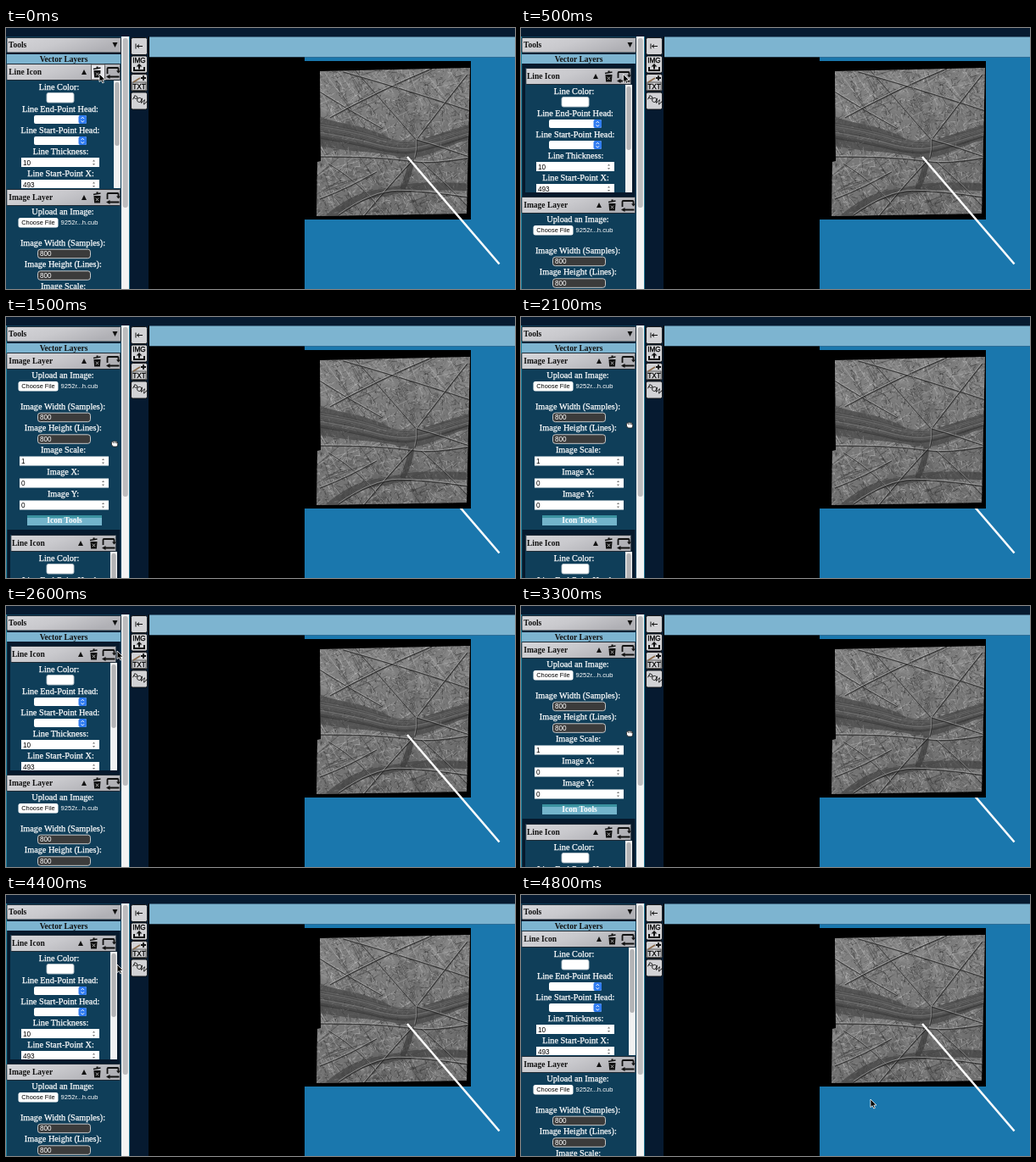
Animation of 600x308 px, one loop 4900 ms. Source, as an HTML page with a canvas:

```html
<!DOCTYPE html>
<html lang="en">
<head>
<meta charset="utf-8">
<title>Layer ordering</title>
<style>
html, body { margin: 0; width: 100%; height: 100%; overflow: hidden; background: #000; }
#stage { position: relative; width: 600px; height: 308px; overflow: hidden; background: #061a30; }
#stage > * { position: absolute; left: 0; top: 0; }
#moon { left: 352px; top: 39px; z-index: 2; }
#ray { z-index: 3; }
#ray.under { z-index: 1; }
#ui, #pointer { z-index: 4; }
text { font-family: "Liberation Serif", Tinos, serif; }
.label { font-size: 10.25px; fill: #fff; text-anchor: middle; stroke: #fff; stroke-width: .25; }
.title { font-size: 9.5px; font-weight: bold; fill: #111; }
.sans { font-family: "Liberation Sans", Arial, sans-serif; font-size: 8.2px; }
.mid { text-anchor: middle; }
</style>
</head>
<body>
<div id="stage">
  <svg id="back" width="600" height="308">
    <rect x="169" y="10.5" width="431" height="24" fill="#7db4d0"/>
    <rect x="169" y="34.5" width="183" height="274" fill="#000"/>
    <rect x="352" y="34.5" width="248" height="274" fill="#1a77ad"/>
  </svg>
  <canvas id="moon" width="196" height="187"></canvas>
  <svg id="ray" width="600" height="308">
    <path d="M473 152L581.5 278.5" stroke="#fff" stroke-width="2.5"/>
  </svg>
  <svg id="ui" width="600" height="308">
    <defs>
      <linearGradient id="metal" x2="1" y2=".4">
        <stop stop-color="#d6d6da"/><stop offset=".5" stop-color="#c9c9cd"/><stop offset="1" stop-color="#b0b0b5"/>
      </linearGradient>
      <clipPath id="fold"><rect y="42" width="136" height="147"/></clipPath>
      <clipPath id="side"><rect y="10" width="136" height="298"/></clipPath>
      <g id="trash">
        <path d="M-4.5 -4L4 -5.5M-1 -6L1 -6.4" stroke="#111" stroke-width="1.5"/>
        <path d="M-4 -2.6H4L3.4 6H-3.4Z" fill="#111"/>
        <path d="M-1.6 .2L1.6 3.6M1.6 .2L-1.6 3.6" stroke="#bbb" stroke-width=".9"/>
      </g>
      <g id="cycle" fill="none" stroke="#111" stroke-width="1.8">
        <path d="M-6.5 2V-4Q-6.5 -5 -5.5 -5H5.5Q6.5 -5 6.5 -4V-1M-4 5.5H7.5"/>
        <path d="M4 -1.5H9L6.5 1.5ZM-3.5 3V8L-8 5.5Z" fill="#111" stroke="none"/>
      </g>
    </defs>
    <g id="panels" clip-path="url(#side)"></g>
    <g id="bars"></g>
  </svg>
  <svg id="pointer" width="600" height="308">
    <path id="arrow" d="M0 0V9.6L2.2 7.6L3.8 11L5.4 10.3L3.9 7H7Z" fill="#000" stroke="#fff" stroke-width=".8"/>
    <path id="hand" d="M-3.6 -1.4Q-3 -4 -1.5 -3Q-.5 -4.2 .5 -3.2Q2 -4 2.6 -2.4Q4 -2.4 3.8 -.4Q4 1.6 2.6 3H-1.6Q-4.4 .8 -3.6 -1.4ZM-1.4 -2.6V-1M.7 -2.8V-1M2.5 -2.2V-.8" fill="#fff" stroke="#222" stroke-width=".9"/>
  </svg>
</div>
<script>
const $ = id => document.getElementById(id);
const LOOP = 4900, STEP = 100, BODY = '#0f3e59';

// SVG helpers
const box = (x, y, w, h, fill, r = 0, stroke = 'none') =>
  `<rect x="${x}" y="${y}" width="${w}" height="${h}" rx="${r}" fill="${fill}" stroke="${stroke}" stroke-width=".9"/>`;
const text = (x, y, s, cls, extra = '') => `<text x="${x}" y="${y}" class="${cls}" ${extra}>${s}</text>`;
const tri = (x, y, d) => `<path d="M${x - 3} ${y + 3 * d}H${x + 3}L${x} ${y - 3 * d}Z" fill="#111"/>`;
const use = (id, x, y) => `<use href="#${id}" x="${x}" y="${y}"/>`;
const shift = (dy, s) => `<g transform="translate(0 ${dy})">${s}</g>`;

const number = (x, y, w, value) => box(x, y, w, 11, '#fff') + text(x + 2, y + 8.6, value, 'sans') +
  `<path d="M${x + w - 8} ${y + 4.5}l1.5 -2l1.5 2zm0 2.4h3l-1.5 2z" fill="#777"/>`;
const dark = (y, value) => box(37.5, y, 62, 10.5, '#3b3b3b', 3, '#d8d8d8') +
  text(40, y + 8.2, value, 'sans', 'fill="#fff"');
const picker = y => box(33, y, 62, 10, '#fff', 2) + box(85.5, y, 9.5, 10, '#2f7bf0', 2) +
  `<path d="M88.5 ${y + 4.2}l1.8 -2l1.8 2m-3.6 2l1.8 2l1.8 -2" fill="none" stroke="#fff" stroke-width=".9"/>`;

function header(y, name, inset, hot) {
  const c = y + 10;
  return box(inset + .8, y + .5, 134 - 2 * inset, 19, 'url(#metal)', 1, '#17212b') +
    (hot ? box(100.5, y + 1, 16, 18, '#e6e6ea', 1, '#555') : '') +
    text(inset ? 7 : 3.2, y + 13.3, name, 'title') +
    tri(92 - inset * .8, c, 1) + use('trash', 107.5 - inset * .8, c + .5) + use('cycle', 126 - inset, c);
}

function linePanel(inset, hot) {
  const bar = 127 - inset * .8;
  return `<g clip-path="url(#fold)">` + box(inset, 42, 135 - 2 * inset, 147, BODY) +
    text(62.5, 72.6, 'Line Color:', 'label') + box(48, 76.5, 32, 11.5, '#fff', 2, '#b9c4cc') +
    text(64, 99, 'Line End-Point Head:', 'label') + picker(103) +
    text(64, 124, 'Line Start-Point Head:', 'label') + picker(128) +
    text(64.5, 149.4, 'Line Thickness:', 'label') + number(18, 153, 92, 10) +
    text(64.5, 175, 'Line Start-Point X:', 'label') + number(18, 179, 92, 493) +
    box(bar, 62, 8, 127, '#f1f1f1') + box(bar + 1.3, 64, 5.4, 75, '#b4b4b6', 2.7) +
    `</g>` + header(42, 'Line Icon', inset, hot);
}

function imagePanel() {
  return box(1, 190, 134, 209, BODY) + header(190, 'Image Layer', 0) +
    text(67, 219.6, 'Upload an Image:', 'label') +
    box(14.5, 224, 47, 11.5, '#fff', 2.5) + text(38, 232.4, 'Choose File', 'sans mid', 'style="font-size:7.4px"') +
    text(64.5, 232.4, '9252r...h.cub', 'sans', 'fill="#fff" style="font-size:7.6px"') +
    text(67, 256.8, 'Image Width (Samples):', 'label') + dark(261.2, 800) +
    text(67.3, 282.4, 'Image Height (Lines):', 'label') + dark(286.8, 800) +
    text(67.5, 308, 'Image Scale:', 'label') + number(16, 312.5, 105, 1) +
    text(67.5, 334, 'Image X:', 'label') + number(16, 338.5, 105, 0) +
    text(67.5, 360, 'Image Y:', 'label') + number(16, 364.5, 105, 0) +
    box(25, 382, 88, 12, '#73b4cb') + box(25, 382, 88, 3, '#3a929f') +
    text(69, 391.2, 'Icon Tools', 'title mid', 'style="fill:#fff"');
}

// Vertical offsets and inset of the panels in each arrangement
const layouts = {
  rest: { line: 0, image: 0, inset: 0 },
  held: { line: 5, image: 9, inset: 5 },
  swapped: { line: 215, image: -148, inset: 5 }
};

function panels(name, hot) {
  const { line, image, inset } = layouts[name];
  return box(0, 10, 136, 298, BODY) +
    (inset ? box(1.5, 30, 133, 278, '#06192c') + box(0, 10, 1, 298, '#2484a0') : box(0, 29, 136, 2, '#06192c')) +
    box(1, 31, 134, 11, '#7db4d0') + text(68, 39.7, 'Vector Layers', 'title mid') +
    box(1, 11.5, 134.5, 17.5, 'url(#metal)', 1, '#17212b') + text(3, 23.4, 'Tools', 'title') + tri(128.5, 20, -1) +
    shift(image, imagePanel()) + shift(line, linePanel(inset, hot));
}

const button = y => box(147.5, y, 19, 20, '#d2d2d5', 2, '#111');
const small = (x, y, s, extra = '') => text(x, y, s, 'sans mid', extra);
$('bars').innerHTML = box(136, 10, 9, 298, '#f3f3f3') + box(137.6, 12, 6.2, 200, '#bdbdbf', 3) +
  box(145, 10, 1, 298, '#1b6f8b') + box(168, 10, 1, 298, '#000') +
  [11.5, 33, 54.5, 76].map(button).join('') +
  `<path d="M153 18.5v6M161 21.5h-6.5m2.5 -2l-2.5 2l2.5 2" fill="none" stroke="#111"/>` +
  small(157, 41, 'IMG', 'stroke="#000" stroke-width=".3"') +
  `<path d="M150 46v5h14v-5h-2v3h-10v-3zM156 48.5v-3h-2.5l3.5 -3.5l3.5 3.5h-2.5v3z" fill="#111"/>` +
  box(149, 64, 16, 9.5, 'none', 0, '#444') + small(157, 72, 'TXT', 'stroke="#000" stroke-width=".3"') +
  `<path d="M150 64l8 -5" stroke="#8a6a4a" stroke-width="1.6"/><path d="M162 56v6m-3 -3h6" stroke="#111" stroke-width="1.8"/>` +
  ['P', 'O', 'W'].map((c, i) => small(152 + 5 * i, 85.5 + 2.2 * i, c, `transform="rotate(30 ${152 + 5 * i} ${83 + 2.2 * i})"`)).join('');

// Fractured, ridged surface
function paintMoon() {
  const g = $('moon').getContext('2d');
  let seed = 77;
  const rnd = () => (seed = seed * 16807 % 2147483647) / 2147483647;
  const trace = (color, width, ...p) => {
    g.strokeStyle = color;
    g.lineWidth = width;
    g.beginPath();
    g.moveTo(p[0], p[1]);
    for (let i = 2; i < p.length - 2; i += 2) {
      const last = i + 4 >= p.length;
      g.quadraticCurveTo(p[i], p[i + 1], last ? p[i + 2] : (p[i] + p[i + 2]) / 2, last ? p[i + 3] : (p[i + 1] + p[i + 3]) / 2);
    }
    if (p.length === 4) g.lineTo(p[2], p[3]);
    g.stroke();
  };
  const ridge = (...p) => {
    trace('rgba(38,38,38,.75)', 1.4, ...p);
    trace('rgba(195,195,195,.65)', .8, ...p.map((v, i) => i % 2 ? v - 1.2 : v - .4));
  };
  const grain = (count, len, alpha) => {
    for (let i = 0; i < count; i++) {
      const x = rnd() * 196, y = rnd() * 186, a = rnd() * 6.3, l = 1 + rnd() * len;
      const tone = rnd() < .5 ? 30 : 205;
      trace(`rgba(${tone},${tone},${tone},${alpha * rnd()})`, .8, x, y, x + Math.cos(a) * l, y + Math.sin(a) * l);
    }
  };
  g.fillStyle = '#000';
  g.fillRect(0, 0, 196, 187);
  g.translate(0, 1);
  g.beginPath();
  [[18, 11], [195, 7], [191, 179], [14, 182], [15, 118], [19, 117]].forEach(p => g.lineTo(...p));
  g.clip();
  const tone = g.createLinearGradient(30, 0, 120, 186);
  tone.addColorStop(0, '#828282');
  tone.addColorStop(.5, '#7a7a7a');
  tone.addColorStop(1, '#6c6c6c');
  g.fillStyle = tone;
  g.fillRect(0, 0, 196, 186);
  // mottling
  for (let i = 0; i < 150; i++) {
    g.fillStyle = i % 2 ? 'rgba(45,45,45,.13)' : 'rgba(185,185,185,.13)';
    g.beginPath();
    g.ellipse(rnd() * 196, rnd() * 186, 3 + rnd() * 13, 2 + rnd() * 5, rnd() * 3, 0, 7);
    g.fill();
  }
  grain(4200, 6, .6);
  for (let i = 0; i < 110; i++) {
    const x = rnd() * 196, y = rnd() * 186, a = (rnd() < .55 ? .75 : -.7) + rnd() * .5, l = 12 + rnd() * 38;
    trace(i % 2 ? 'rgba(40,40,40,.5)' : 'rgba(200,200,200,.42)', .8, x, y, x + Math.cos(a) * l, y + Math.sin(a) * l);
  }
  // broad dark bands
  g.fillStyle = 'rgba(76,76,76,.8)';
  g.beginPath();
  g.moveTo(10, 62);
  g.bezierCurveTo(45, 76, 70, 73, 100, 90);
  g.bezierCurveTo(130, 104, 155, 82, 196, 74);
  g.lineTo(196, 92);
  g.bezierCurveTo(165, 96, 145, 118, 112, 112);
  g.bezierCurveTo(75, 104, 55, 108, 10, 97);
  g.fill();
  for (let i = 0; i < 40; i++) {
    const k = rnd() * 20, c = i % 2 ? 50 : 135;
    trace(`rgba(${c},${c},${c},.3)`, .9, 12, 70 + k, 60, 78 + k, 100, 92 + k * .8, 135, 93 + k * .8, 196, 76 + k * .6);
  }
  trace('rgba(70,70,70,.75)', 9, 28, 184, 58, 160, 100, 153, 140, 145, 196, 148);
  trace('rgba(62,62,62,.75)', 7, 126, 113, 125, 130, 115, 150);
  grain(1100, 4, .3);
  ridge(14, 112, 60, 112, 110, 115, 150, 121, 196, 113);
  ridge(16, 34, 52, 57, 92, 79);
  ridge(60, 10, 88, 42, 132, 92);
  ridge(30, 66, 88, 34, 150, 8);
  ridge(46, 12, 110, 30, 196, 58);
  ridge(132, 92, 160, 55, 192, 15);
  ridge(100, 10, 120, 50, 134, 92);
  ridge(132, 92, 160, 100, 194, 112);
  ridge(132, 92, 133, 104, 130, 114);
  ridge(70, 182, 105, 140, 128, 116);
  ridge(28, 120, 70, 145, 96, 182);
  ridge(138, 118, 165, 142, 192, 170);
  ridge(40, 181, 80, 153, 140, 152, 194, 160);
  ridge(18, 162, 50, 150, 85, 130);
}

// time, arrangement
const scenes = [[0, 'rest'], [500, 'held'], [1500, 'swapped'], [2400, 'held'], [3200, 'swapped'], [4000, 'held'], [4700, 'rest']];
// time, x, y
const path = [[0, 110, 54], [300, 110, 54], [700, 131, 55], [1000, 127, 62], [1300, 127, 91], [1500, 128, 150],
  [1800, 128, 165], [2100, 128, 128], [2400, 128, 70], [2600, 131, 53], [2900, 131, 53], [3300, 128, 151],
  [3600, 128, 178], [4000, 128, 100], [4300, 131, 82], [4400, 131, 82], [4700, 412, 241], [4900, 412, 241]];

function cursorAt(t) {
  const i = path.findIndex(p => p[0] > t);
  const [a, b] = [path[i - 1], path[i]];
  const k = (t - a[0]) / (b[0] - a[0]);
  return [a[1] + (b[1] - a[1]) * k, a[2] + (b[2] - a[2]) * k];
}

let shown = '';
function draw(now) {
  const t = Math.floor(now % LOOP / STEP) * STEP;
  const name = scenes.filter(s => s[0] <= t).pop()[1];
  const hot = t < 400;
  if (shown !== name + hot) {
    shown = name + hot;
    $('panels').innerHTML = panels(name, hot);
    $('ray').classList.toggle('under', name === 'swapped');
  }
  const grabbing = t >= 1000 && t < 2500 || t >= 3000 && t < 4200;
  const [x, y] = cursorAt(t);
  for (const id of ['arrow', 'hand']) {
    $(id).setAttribute('transform', `translate(${x} ${y})`);
    $(id).style.display = (id === 'hand') === grabbing ? '' : 'none';
  }
  requestAnimationFrame(tick);
}

const start = performance.now();
const tick = () => draw(performance.now() - start);
paintMoon();
tick();
</script>
</body>
</html>
```
